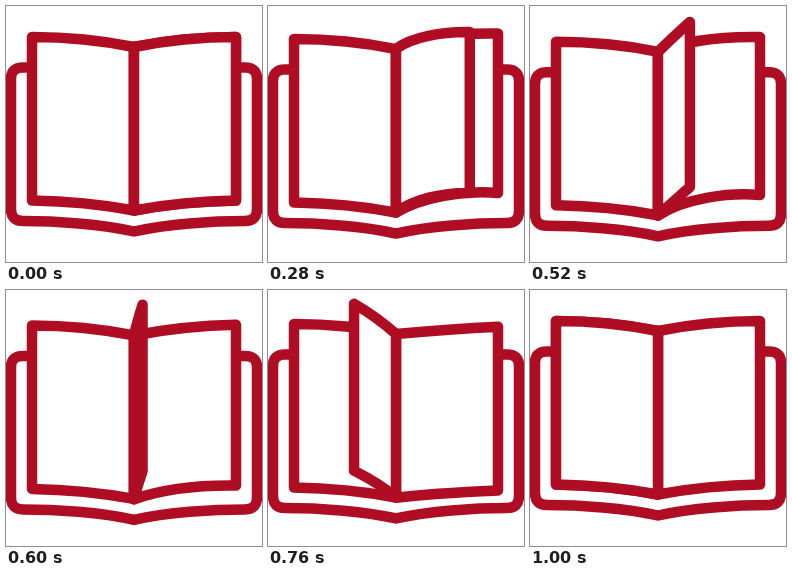
Recreate the animation shown at these times as an HTML page without scripts. Size 256 by 256 pixels, loop 1.12 s.

```html
<!DOCTYPE html>
<html lang="en">
<head>
<meta charset="utf-8">
<title>Turning page</title>
<style>
  html, body { margin: 0; width: 100%; height: 100%; overflow: hidden; background: #fff; }
  svg { display: block; width: 100vw; height: 100vh; }
  path { fill: #fff; stroke: #af0d24; stroke-width: 10.5; stroke-linejoin: round; stroke-linecap: round; }
  .cover { fill: none; stroke-linecap: butt; }
</style>
</head>
<body>
<svg viewBox="0 0 256 256">
  <!-- cover and left page sink slightly while the leaf is lifted -->
  <g>
    <animateTransform attributeName="transform" type="translate" dur="1.12s" repeatCount="indefinite"
      keyTimes="0;.107;.179;.321;.464;.607;.75;.893;1"
      values="0 0;0 0;0 .8;0 3.3;0 4.8;0 4;0 2;0 0;0 0"/>
    <path class="cover" d="M26 61.5H17Q5 61.5 5 73V203Q5 215 17 215C50 215 95 218 128 225.5C161 218 206 215 239 215Q251 215 251 203V73Q251 61.5 239 61.5H230"/>
    <path d="M128 41C96 34.5 61 31 26 31V194.5C61 195 96 198.5 128 204.5Z"/>
  </g>

  <!-- right page -->
  <path d="M128 41C160 34.5 195 31 230 31V194.5C195 195 160 198.5 128 204.5Z">
    <animate attributeName="d" dur="1.12s" repeatCount="indefinite"
      keyTimes="0;.107;.179;.321;.464;.607;.75;.893;1"
      values="M128 41C160 34.5 195 31 230 31V194.5C195 195 160 198.5 128 204.5Z;
              M128 41C160 34.5 195 31 230 31V194.5C195 195 160 198.5 128 204.5Z;
              M128 42C160 32 195 30 230 30V191.5C195 191 155 197 128 205.5Z;
              M128 44C150 28 190 24 230 25V182.5C195 178 155 184 128 207.5Z;
              M128 46C150 37 185 30 230 31V189C200 186 155 192 128 209.5Z;
              M128 45C162 43 196 41 230 38.5V202C196 204 162 205 128 209Z;
              M128 43C162 39 196 36 230 35V199C196 200 162 202 128 206.5Z;
              M128 41C160 34.5 195 31 230 31V194.5C195 195 160 198.5 128 204.5Z;
              M128 41C160 34.5 195 31 230 31V194.5C195 195 160 198.5 128 204.5Z"/>
  </path>

  <!-- turning leaf -->
  <path d="M128 41C160 34.5 195 31 230 31V194.5C195 195 160 198.5 128 204.5Z">
    <animate attributeName="d" dur="1.12s" repeatCount="indefinite"
      keyTimes="0;.107;.179;.321;.464;.607;.643;.75;.893;1"
      values="M128 41C160 34.5 195 31 230 31V194.5C195 195 160 198.5 128 204.5Z;
              M128 41C160 34.5 195 31 230 31V194.5C195 195 160 198.5 128 204.5Z;
              M128 42C152 33 190 29 220 29V191.5C190 191 152 196 128 205.5Z;
              M128 44C134 29 160 22 184 23V182.5C162 182 140 190 128 207.5Z;
              M128 46C138 36 149 26 160.3 16V181C149 191 138 200 128 209.5Z;
              M128 45C123 34 118 24 113.5 13.5V181C118 190 123 200 128 209Z;
              M128 44.5C119 32 109 21 99 12V180C109 188 119 197 128 208Z;
              M128 43C107 33 84 24 61 17V182C84 188 107 195 128 206.5Z;
              M128 41C96 34.5 61 31 26 31V194.5C61 195 96 198.5 128 204.5Z;
              M128 41C96 34.5 61 31 26 31V194.5C61 195 96 198.5 128 204.5Z"/>
  </path>
</svg>
</body>
</html>
```
